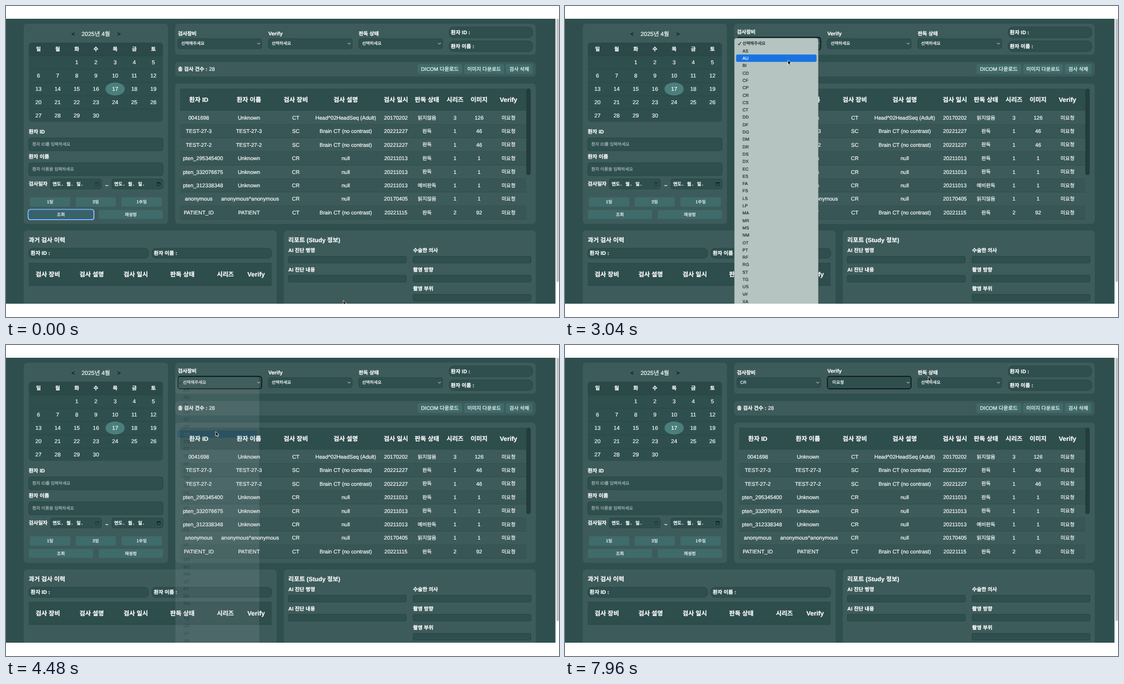
These frames come from a looping animation (997 px wide and 561 px high, 8 s). An HTML page:

```html
<!DOCTYPE html>
<html lang="ko">
<head>
<meta charset="utf-8">
<style>
html, body { margin: 0; width: 100%; height: 100%; overflow: hidden; background: #fff; }
svg { display: block; width: 997px; height: 561px; }
text {
  font-family: 'Liberation Sans', 'Noto Sans CJK KR', 'Noto Sans CJK', sans-serif;
  white-space: pre; text-rendering: geometricPrecision;
  fill: currentColor; stroke: currentColor; stroke-width: 0.2px;
}
.mono { font-family: 'Liberation Mono', 'Noto Sans CJK KR', 'Noto Sans CJK', monospace; }
</style>
</head>
<body>
<svg id="stage" viewBox="0 0 997 561">
  <defs><clipPath id="screen"><rect y="23" width="997" height="514"/></clipPath></defs>
</svg>
<script>
const NS = 'http://www.w3.org/2000/svg';
const LOOP = 8000, FRAME = 40;
const PAGE = '#2f4f4f', PANEL = '#3d5b5b', DARK = '#2e4d4d', EDGE = '#243f3f', BUTTON = '#3f6b6a';

function add(parent, tag, attrs = {}) {
  const el = document.createElementNS(NS, tag);
  for (const k in attrs) el.setAttribute(k, attrs[k]);
  return parent.appendChild(el);
}

// Box given by its left, top, right and bottom edges.
function box(parent, l, t, r, b, fill, rx = 0, more = {}) {
  return add(parent, 'rect', { x: l, y: t, width: r - l, height: b - t, rx, fill, ...more });
}

// Text whose glyphs are centred vertically on y.
function label(parent, s, x, y, size, o = {}) {
  const { bold, mid, color = '#fff', cls = '' } = o;
  const el = add(parent, 'text', {
    x, y: y + size * 0.36, 'font-size': size, color, class: cls,
    'font-weight': bold ? 700 : 400, 'text-anchor': mid ? 'middle' : 'start'
  });
  el.textContent = s;
  return el;
}

const hangul = s => /[가-힣]/.test(s);
const field = (l, t, r, b, rx = 4) =>
  box(root, l, t, r, b, PAGE, rx, { stroke: EDGE, 'stroke-width': 0.8 });

function button(s, l, t, r, b, size = 7.8) {
  box(root, l, t, r, b, BUTTON, 3);
  label(root, s, (l + r) / 2, (t + b) / 2, size, { mid: true });
}

const stage = document.getElementById('stage');
const root = add(stage, 'g', { 'clip-path': 'url(#screen)' });

function drawCalendar() {
  label(root, '<', 118, 50, 10.5, { color: '#0a1212' });
  label(root, '2025년 4월', 162, 50, 10.5, { mid: true });
  label(root, '>', 200.5, 50, 10.5, { color: '#0a1212' });
  box(root, 41, 66, 283, 209, PAGE, 6);
  box(root, 41, 66, 283, 90, '#2b4949', 6);
  const col = i => 58.5 + 34.55 * i;
  [...'일월화수목금토'].forEach((d, i) => label(root, d, col(i), 77.5, 9.4, { bold: true, mid: true }));
  for (let r = 0; r < 5; r++) box(root, 41, 89.6 + 24 * r, 283, 90.4 + 24 * r, '#274343');
  add(root, 'ellipse', { cx: 196.7, cy: 149.7, rx: 17.3, ry: 11.8, fill: '#4a7f7c' });
  for (let d = 1; d <= 30; d++) {
    const n = d + 1;
    label(root, d, col(n % 7), 101.8 + 23.9 * Math.floor(n / 7), 10, { mid: true });
  }
}

function drawDate(x, icon) {
  field(x, 312, x + 92, 330);
  [['연도.', 4], ['월.', 29], ['일.', 47]]
    .forEach(([s, dx]) => label(root, s, x + dx, 321, 8.2, { cls: 'mono', bold: true }));
  box(root, x + 81.5, 318.5, x + 87, 324, 'none', 0.5, { stroke: icon, 'stroke-width': 0.8 });
  box(root, x + 81, 318, x + 87.5, 319.6, icon);
}

function drawSearch() {
  [['환자 ID', '환자 ID를 입력하세요', 227], ['환자 이름', '환자 이름을 입력하세요', 272]].forEach(([name, hint, y]) => {
    label(root, name, 41, y, 9.3, { bold: true });
    field(41, y + 11, 283, y + 34);
    label(root, hint, 47.5, y + 22.5, 7.7, { color: '#a9b5b5' });
  });
  label(root, '검사일자', 41, 321, 9.2, { bold: true });
  drawDate(80, '#1c3333');
  label(root, '~', 179, 324, 9.5, { bold: true });
  drawDate(191, '#0b1616');
  button('1일', 43, 345, 116, 362);
  button('3일', 125.5, 345, 198, 362);
  button('1주일', 208, 345, 281, 362);
  button('재설정', 167, 368, 283, 384);
  button('조회', 41, 368, 157, 384);
}

function drawTable() {
  const cols = [347.5, 438, 522.5, 612.5, 703, 759, 809.5, 853, 906];
  const lefts = [319, 388];
  box(root, 314, 149, 938, 189, DARK);
  ['환자 ID', '환자 이름', '검사 장비', '검사 설명', '검사 일시', '판독 상태', '시리즈', '이미지', 'Verify']
    .forEach((s, i) => label(root, s, cols[i], 169, hangul(s) ? 11.1 : 11.5, { bold: true, mid: true }));
  const brain = 'Brain CT (no contrast)';
  const rows = [
    ['0041698', 'Unknown', 'CT', 'Head^02HeadSeq (Adult)', '20170202', '읽지않음', 3, 126],
    ['TEST-27-3', 'TEST-27-3', 'SC', brain, '20221227', '판독', 1, 46],
    ['TEST-27-2', 'TEST-27-2', 'SC', brain, '20221227', '판독', 1, 46],
    ['pten_295345400', 'Unknown', 'CR', 'null', '20211013', '판독', 1, 1],
    ['pten_332076675', 'Unknown', 'CR', 'null', '20211013', '판독', 1, 1],
    ['pten_312338348', 'Unknown', 'CR', 'null', '20211013', '예비판독', 1, 1],
    ['anonymous', 'anonymous^anonymous', 'CR', 'null', '20170405', '읽지않음', 1, 1],
    ['PATIENT_ID', 'PATIENT', 'CT', brain, '20221115', '판독', 2, 92]
  ];
  rows.forEach((row, r) => {
    const y = 201.3 + 24.45 * r;
    if (r % 2) box(root, 314, y - 12.2, 938, y + 12.2, '#385656');
    box(root, 314, y + 11.9, 938, y + 12.6, '#2d4a4a');
    [...row, '미요청'].forEach((s, i) => {
      const el = label(root, s, cols[i], y, hangul(s) ? 9.1 : 9.65, { mid: true });
      // Wide content starts at the cell's left padding.
      if (lefts[i]) el.setAttribute('x', Math.max(cols[i], lefts[i] + el.getComputedTextLength() / 2));
    });
  });
  box(root, 938, 149, 946, 305, '#213d3c', 4);
}

function drawHistory() {
  label(root, '과거 검사 이력', 41, 422.5, 10.8, { bold: true });
  field(41, 437, 257, 455, 7);
  field(263, 437, 479, 455, 7);
  label(root, '환자 ID :', 44.5, 445.5, 9.4, { bold: true });
  label(root, '환자 이름 :', 266.5, 445.5, 9.2, { bold: true });
  box(root, 41, 464, 479, 504, DARK);
  box(root, 41, 463.6, 479, 464.4, EDGE);
  box(root, 41, 503.6, 479, 504.4, EDGE);
  const cols = [75.5, 154.5, 234, 318, 395.5, 451];
  ['검사 장비', '검사 설명', '검사 일시', '판독 상태', '시리즈', 'Verify']
    .forEach((s, i) => label(root, s, cols[i], 484, hangul(s) ? 11.1 : 11.5, { bold: true, mid: true }));
}

function drawReport() {
  label(root, '리포트 (Study 정보)', 509, 422.5, 10.9, { bold: true });
  const part = (s, x, y) => {
    label(root, s, x, y, 9.2, { bold: true });
    field(x, y + 10.5, x + 212.5, y + 22.5, 2);
  };
  ['AI 진단 병명', 'AI 진단 내용'].forEach((s, i) => part(s, 509, 441 + 34.4 * i));
  ['수술한 의사', '촬영 방향', '촬영 부위'].forEach((s, i) => part(s, 734, 441 + 34.4 * i));
}

function drawPage() {
  box(root, 0, 23, 990.6, 537, PAGE);
  box(root, 992.3, 23, 996.8, 498, '#c1c1c1', 2.2);
  [[32, 32, 292, 393], [305, 32, 955, 88], [305, 101, 955, 127], [305, 140, 955, 393],
   [32, 405, 488, 560], [501, 405, 955, 560]].forEach(p => box(root, ...p, PANEL, 6));
  drawCalendar();
  drawSearch();
  [['환자 ID :', 47.5, 9.4], ['환자 이름 :', 72.5, 9.2]].forEach(([s, y, size]) => {
    field(799, y - 9.5, 949.5, y + 9.5, 8);
    label(root, s, 802, y, size, { bold: true });
  });
  label(root, '총 검사 건수 :', 310, 113.5, 9.2, { bold: true });
  label(root, '28', 366, 113.5, 9.6);
  button('DICOM 다운로드', 742, 105, 822.5, 122.5, 9.3);
  button('이미지 다운로드', 826, 105, 898, 122.5, 9);
  button('검사 삭제', 901, 105, 949.5, 122.5, 9);
  drawTable();
  drawHistory();
  drawReport();
}

function makeSelect(name, x) {
  const title = label(root, name, x, 49.5, hangul(name) ? 9.1 : 9.5, { bold: true });
  const frame = field(x, 59, x + 151, 77);
  const value = label(root, '', x + 6, 67.7, 7.6);
  add(root, 'path', { d: `M${x + 143.2} 66.6l2.4 2.4 2.4-2.4`, fill: 'none', stroke: '#fff', 'stroke-width': 0.9 });
  const titleY = +title.getAttribute('y');
  return (focus, text) => {
    title.setAttribute('y', titleY - (focus ? 2.8 : 0));
    frame.setAttribute('y', focus ? 56.5 : 59);
    frame.setAttribute('height', focus ? 22.5 : 18);
    frame.setAttribute('stroke', focus ? '#060c0c' : EDGE);
    frame.setAttribute('stroke-width', focus ? 1.3 : 0.8);
    value.setAttribute('x', x + (focus ? 9 : 6));
    value.textContent = text;
  };
}

const PITCH = 13.3, FIRST = 67.6;

function makeMenu(items, x) {
  const g = add(root, 'g');
  const bottom = FIRST + PITCH * (items.length - 0.5) + 3;
  box(g, x, 58, x + 151, bottom, '#b6c4c1', 4, { stroke: '#8fa09d', 'stroke-width': 0.5 });
  const bar = box(g, x + 3, 0, x + 148, PITCH, '#1873e2', 2.5);
  const texts = items.map((s, i) => label(g, s, x + 14.5, FIRST + PITCH * i, hangul(s) ? 7.5 : 7.8));
  const check = add(g, 'path', { d: `M${x + 6.5} 68l1.8 2.3 3.4-5.2`, fill: 'none', 'stroke-width': 1.1 });
  return (opacity, y) => {
    g.setAttribute('opacity', opacity);
    const pick = Math.max(0, Math.min(items.length - 1, Math.round((y - FIRST) / PITCH)));
    const ink = i => i === pick ? '#fff' : '#1d2b2a';
    bar.setAttribute('y', FIRST + PITCH * (pick - 0.5));
    texts.forEach((el, i) => el.setAttribute('color', ink(i)));
    check.setAttribute('stroke', ink(0));
  };
}

drawPage();
const ring = add(root, 'g');
box(ring, 40, 367, 158.5, 385.5, '#3a6262', 4, { stroke: '#fff', 'stroke-width': 1.2 });
box(ring, 41, 368, 157.5, 384.5, 'none', 3.5, { stroke: '#1b6fe8', 'stroke-width': 1.4 });
label(ring, '조회', 99, 376, 7.8, { mid: true });

const device = makeSelect('검사장비', 310);
const verify = makeSelect('Verify', 473);
makeSelect('판독 상태', 636)(false, '선택하세요');

const codes = 'AS AU BI CD CF CP CR CS CT DD DF DG DM DR DS DX EC ES FA FS LS LP MA MR MS NM OT PT RF RG ST TG US VF XA';
const deviceMenu = makeMenu(['선택해주세요', ...codes.split(' ')], 305.5);
const verifyMenu = makeMenu(['선택하세요', '미요청', '요청'], 469);

const cursor = add(root, 'path', {
  d: 'M0 0V8.4L1.9 6.7 3.2 9.7 4.7 9 3.4 6.1H6Z',
  fill: '#000', stroke: '#fff', 'stroke-width': 0.8, 'stroke-linejoin': 'round'
});

// Pointer stops: time, x, y.
const stops = [
  [0, 608, 531], [520, 608, 531], [1320, 428, 84], [1360, 428, 84], [1720, 412, 68], [2000, 412, 68],
  [2080, 411, 66], [2600, 411, 66], [3040, 402, 97.5], [3240, 398, 115], [3280, 398, 115],
  [3680, 382, 149], [3920, 382, 149], [4200, 378, 156], [4760, 378, 156], [5520, 516, 70],
  [5840, 516, 70], [5880, 517.5, 69.5], [6800, 517.5, 69.5], [7040, 514, 82], [7440, 514, 82], [7960, 655, 57]
];

function pointer(t) {
  const i = stops.findIndex(s => s[0] > t);
  if (i < 0) return stops[stops.length - 1].slice(1);
  const [t0, x0, y0] = stops[i - 1], [t1, x1, y1] = stops[i];
  const u = (t - t0) / (t1 - t0), e = u * u * (3 - 2 * u);
  return [x0 + (x1 - x0) * e, y0 + (y1 - y0) * e];
}

// A menu opens at once and fades out shortly after the click.
const menuOpacity = (t, open, click) =>
  t < open ? 0 : Math.max(0, Math.min(1, 1 - (t - click) / 92));

function render(t) {
  const [x, y] = pointer(t);
  cursor.setAttribute('transform', `translate(${x} ${y})`);
  ring.setAttribute('opacity', t < 2440 ? 1 : 0);
  device(t >= 2440 && t < 6280, t < 4520 ? '선택해주세요' : 'CR');
  verify(t >= 6280, t < 7400 ? '선택하세요' : '미요청');
  deviceMenu(menuOpacity(t, 2480, 4400), y);
  verifyMenu(menuOpacity(t, 6320, 7280), y);
}

const start = performance.now();
function tick() {
  const t = (performance.now() - start) % LOOP;
  render(Math.floor(t / FRAME) * FRAME);
  requestAnimationFrame(tick);
}
tick();
</script>
</body>
</html>
```
